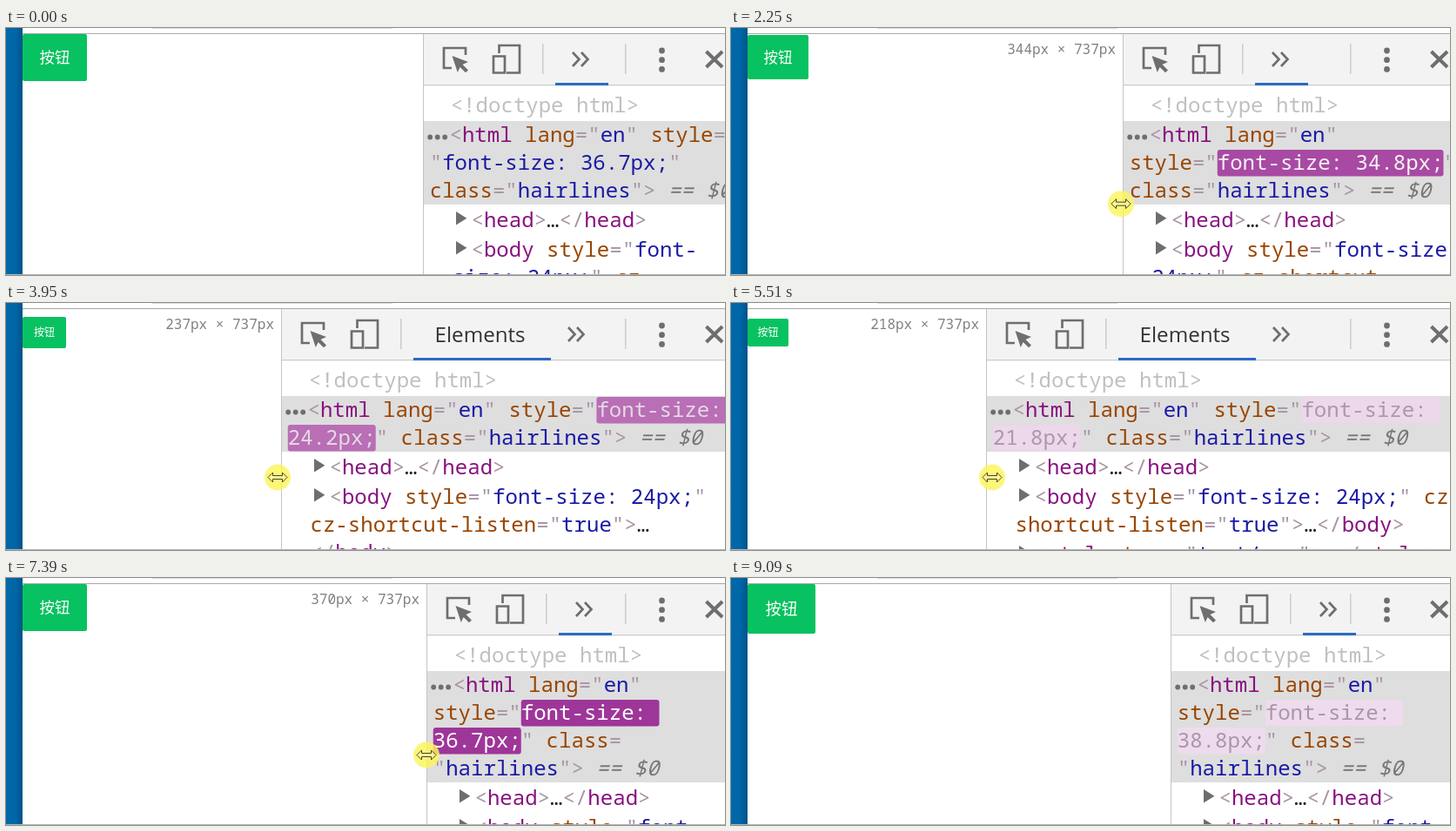
Write an HTML page that moves like this. It is 826 by 284 pixels and loops after 9250 ms.

```html
<!DOCTYPE html>
<html lang="zh">
<head>
<meta charset="utf-8">
<title>rem resize</title>
<style>
html, body { margin: 0; width: 100%; height: 100%; overflow: hidden; background: #fff; }
svg { display: block; width: 826px; height: 284px; }
text { white-space: pre; }
.code { font: 24.05px "Noto Sans Mono", "DejaVu Sans Mono", monospace; }
.slant { font-style: italic; }
.size { font: 16px "Noto Sans Mono", "DejaVu Sans Mono", monospace; fill: #808080; }
.tab { font: 24.2px "Open Sans", "Noto Sans", sans-serif; fill: #333; }
.btn { font-family: "Noto Sans CJK SC", "Noto Sans CJK", sans-serif; fill: #fff; }
.icon { fill: none; stroke: #6e6e6e; stroke-width: 2.7; }
.solid { fill: #6e6e6e; }
</style>
</head>
<body>
<svg viewBox="0 0 826 284">
  <defs>
    <linearGradient id="desk">
      <stop offset="0" stop-color="#0069ab"/>
      <stop offset=".6" stop-color="#0065a5"/>
      <stop offset="1" stop-color="#005288"/>
    </linearGradient>
  </defs>
  <rect width="826" height="284" fill="#fff"/>
  <rect width="19" height="284" fill="url(#desk)"/>
  <rect x="168" width="276" height="1" fill="#dcdcdc"/>
  <g id="page"></g>
  <g id="panel"></g>
  <g id="fixed">
    <rect x="711" y="18" width="1.5" height="35" fill="#ccc"/>
    <g class="solid">
      <circle cx="753.5" cy="26" r="3.4"/>
      <circle cx="753.5" cy="36.7" r="3.4"/>
      <circle cx="753.5" cy="47.4" r="3.4"/>
    </g>
    <path class="icon" style="stroke-width:4" d="M804.5 27L823 45M823 27L804.5 45"/>
  </g>
  <rect x="19" y="6" width="807" height="1" fill="#a9a9a9"/>
  <rect x="0" y="283" width="826" height="1" fill="#b4b4b4"/>
  <g id="mouse"></g>
</svg>
<script>
const LOOP = 9250, PITCH = 24.05 * 0.6, RIGHT = 839.5;
const COL = { tag: '#881280', sym: '#a894a6', attr: '#994500', val: '#1a1aa6', doc: '#c0c0c0', dots: '#222', note: '#777' };

// Moments at which the picture refreshes: start, end, count
const times = [0];
for (const [a, b, n] of [[90, 850, 6], [1630, 1630, 1], [1940, 2860, 7], [3020, 3950, 7], [4100, 5020, 7],
  [5190, 5190, 1], [5510, 6440, 7], [6590, 7540, 7], [7690, 8620, 7], [8790, 9090, 3]])
  for (let i = 0; i < n; i++) times.push(n > 1 ? a + (b - a) * i / (n - 1) : a);

// time, viewport width, root size x10, highlight fade, pointer offset, pointer y
const keys = [
  [0, 367, 367, 1, 0, 203],
  [1940, 367, 367, 1, 0, 203],
  [2093, 357, 362, .1, -2, 202],
  [3020, 279, 279, .1, -2, 200],
  [3950, 237, 242, .28, -4, 200],
  [4100, 232, 234, .2, -3, 200],
  [4860, 218, 218, .1, 7, 200],
  [5020, 218, 218, .35, 7, 200],
  [5190, 218, 218, .53, 7, 200],
  [5510, 218, 218, .8, 7, 200],
  [5665, 226, 222, .1, 5, 200],
  [7380, 370, 367, 0, 0, 203],
  [7540, 376, 374, .15, 0, 203],
  [8460, 388, 388, .1, 0, 203],
  [8620, 388, 388, .45, 0, 203],
  [9090, 388, 388, .82, 0, 203]
];

const $ = id => document.getElementById(id);
const esc = s => s.replace(/&/g, '&amp;').replace(/</g, '&lt;').replace(/>/g, '&gt;');
const rect = (x, y, w, h, fill, r = 0) => `<rect x="${x}" y="${y}" width="${w}" height="${h}" fill="${fill}" rx="${r}"/>`;
const mix = (a, b, k) => `rgb(${a.map((v, i) => Math.round(v + (b[i] - v) * k))})`;

function sample(t) {
  let i = keys.length - 1;
  while (i && keys[i][0] > t) i--;
  const a = keys[i], b = keys[i + 1] || a;
  const k = b === a ? 0 : (t - a[0]) / (b[0] - a[0]);
  return a.map((v, j) => v + (b[j] - v) * k);
}

// Node helpers: lists of [text, colour, hot]
const attr = (name, value, hot) => [[' ', 'sym'], [name, 'attr'], ['="', 'sym'], [value, 'val', hot], ['"', 'sym']];
const open = (tag, ...attrs) => [['<', 'sym'], [tag, 'tag'], ...attrs.flat(), ['>', 'sym']];
const closed = (tag, ...attrs) => [...open(tag, ...attrs), ['…', 'dots'], ['</', 'sym'], [tag, 'tag'], ['>', 'sym']];

function wrap(parts, first, rest) {
  const chars = parts.flatMap(([s, c, hot]) => [...s].map(ch => ({ ch, c, hot: !!hot })));
  const canBreak = i => {
    const { ch } = chars[i], next = chars[i + 1];
    if (!next) return true;
    if (ch === '=') return next.ch === '"' && !(chars[i + 2] && chars[i + 2].hot);
    return ' -…'.includes(ch);
  };
  const lines = [[]];
  let word = [], x = first;
  chars.forEach((c, i) => {
    word.push(c);
    if (!canBreak(i)) return;
    const solid = word.filter(w => w.ch !== ' ').length;
    if (x + solid * PITCH > RIGHT && lines[lines.length - 1].length) {
      lines.push([]);
      x = rest;
    }
    lines[lines.length - 1].push(...word);
    x += word.length * PITCH;
    word = [];
  });
  return lines;
}

function drawLine(line, x, top, fade) {
  let out = '';
  for (let i = 0; i < line.length;) {
    let j = i;
    while (j < line.length && line[j].c === line[i].c && line[j].hot === line[i].hot) j++;
    const { c, hot } = line[i], px = x + i * PITCH;
    let fill = COL[c];
    if (hot) {
      out += rect(px, top + 1, (j - i) * PITCH, 30.5, mix([158, 54, 153], [255, 255, 255], fade), 3);
      fill = mix([255, 255, 255], [168, 148, 166], Math.min(1, fade * 1.2));
    }
    const style = c === 'note' ? 'code slant' : 'code';
    out += `<text class="${style}" x="${px}" y="${top + 24}" fill="${fill}">${esc(line.slice(i, j).map(k => k.ch).join(''))}</text>`;
    i = j;
  }
  return out;
}

function drawTree(X, rem, fade) {
  let y = 73, out = '';
  const node = (parts, first, rest, kind) => {
    const lines = wrap(parts, X + first, X + rest);
    if (kind === 'picked') {
      out += rect(X + 1, y, 826 - X, lines.length * 32, '#dedede');
      for (const d of [8.2, 16.7, 25.2]) out += `<circle class="solid" cx="${X + d}" cy="${y + 18.5}" r="2.9"/>`;
    }
    if (kind === 'fold') out += `<path class="solid" d="M${X + 38} ${y + 6}l12.4 7.8l-12.4 7.8z"/>`;
    lines.forEach((l, i) => { out += drawLine(l, X + (i ? rest : first), y + i * 32, fade); });
    y += lines.length * 32 + 2;
  };
  node([['<!doctype html>', 'doc']], 31.7, 8);
  node([...open('html', attr('lang', 'en'), attr('style', `font-size: ${(rem / 10).toFixed(1)}px;`, fade < 1),
    attr('class', 'hairlines')), [' == $0', 'note']], 30.5, 7.75, 'picked');
  node(closed('head'), 55.5, 33.5, 'fold');
  node(closed('body', attr('style', 'font-size: 24px;'), attr('cz-shortcut-listen', 'true')), 55.5, 33.5, 'fold');
  if (y < 284) node(closed('style', attr('type', 'text/css')), 55.5, 33.5, 'fold');
  return out;
}

function drawBar(X) {
  const wide = X < 341, tabW = wide ? 158 : 61, more = X + (wide ? 330 : 172);
  let out = rect(X, 7, 826 - X, 58, '#f3f3f3') + rect(X, 65, 826 - X, 1.3, '#ccc');
  out += `<g transform="translate(${X})">
    <path class="icon" d="M49 31V23H24V46H33"/>
    <path class="solid" d="M33.5 32L52 39L45.5 42L52 48.5L49 51.3L42.6 45L39.8 51z"/>
    <path class="icon" d="M87.5 29V20H111V51.5H96"/>
    <path class="icon" d="M81 32.5H94V51.5H81z"/>
    <rect x="137" y="18" width="1.5" height="35" fill="#ccc"/>
    ${rect(152, 63, tabW, 3, '#2a6cc4')}
    ${wide ? '<text class="tab" x="176.5" y="45">Elements</text>' : ''}
  </g>`;
  return out + `<path class="icon" d="M${more} 28l7.5 8l-7.5 8m10 -16l7.5 8l-7.5 8"/>`;
}

function drawPage(X, w, rem, label) {
  const fs = rem / 10, em = Math.max(12, fs * .475), bw = Math.round(fs * 1.04 + em * 2 + .8), bh = Math.round(fs * 1.468);
  const top = Math.max(7, Math.floor(34 - bh / 2));
  let out = rect(19, top, bw, bh, '#08c160', 2);
  out += `<text class="btn" font-size="${em}" x="${19 + bw / 2}" y="${top + bh / 2 + em * .37}" text-anchor="middle">按钮</text>`;
  if (label) out += `<text class="size" x="${X - 8}" y="29.5" text-anchor="end">${w}px × 737px</text>`;
  return out;
}

const arrow = (x, y) => `<path transform="translate(${x} ${y})" d="M.5 .5V16L4 12.7L6.5 18.4L9 17.3L6.5 11.7H11.5z" fill="#fff" stroke="#000"/>`;
const sizer = (x, y) => `<path transform="translate(${x} ${y})" d="M-11 0L-5.5 -5.5V-2H5.5V-5.5L11 0L5.5 5.5V2H-5.5V5.5z" fill="#fff" fill-opacity=".25" stroke="#4a4420"/>`;

function drawMouse(t, x, y) {
  if (t < 300 || t >= 9000) return '';
  if (t < 1630) {
    const k = Math.max(0, 1 - (t - 300) / 520) ** 2;
    return arrow(477.5 - 20 * k, 200 + 75 * k);
  }
  if (t >= 8750) return arrow(x, y + (t - 8750) * .4);
  const held = t >= 1940 && t < 8600;
  return (held ? `<circle cx="${x}" cy="${y}" r="15" fill="#fbf55c" fill-opacity=".82"/>` : '') + sizer(x, y);
}

function draw(t) {
  const [, width, size, fade, dx, my] = sample(t);
  const w = Math.round(width), rem = Math.round(size);
  const X = Math.round(20 + 1.25 * w);
  $('page').innerHTML = drawPage(X, w, rem, t > 2000 && t < 8900);
  $('panel').innerHTML = rect(X, 7, 826 - X, 277, '#fff') + drawTree(X, rem, fade) + drawBar(X) + rect(X, 7, 1, 277, '#c4c4c4');
  $('mouse').innerHTML = drawMouse(t, X + dx, my + .5);
}

const start = performance.now();
let shown = -1;
function tick() {
  const t = (performance.now() - start) % LOOP;
  let i = times.length - 1;
  while (times[i] > t) i--;
  if (i !== shown) draw(times[shown = i]);
  requestAnimationFrame(tick);
}
tick();
</script>
</body>
</html>
```
